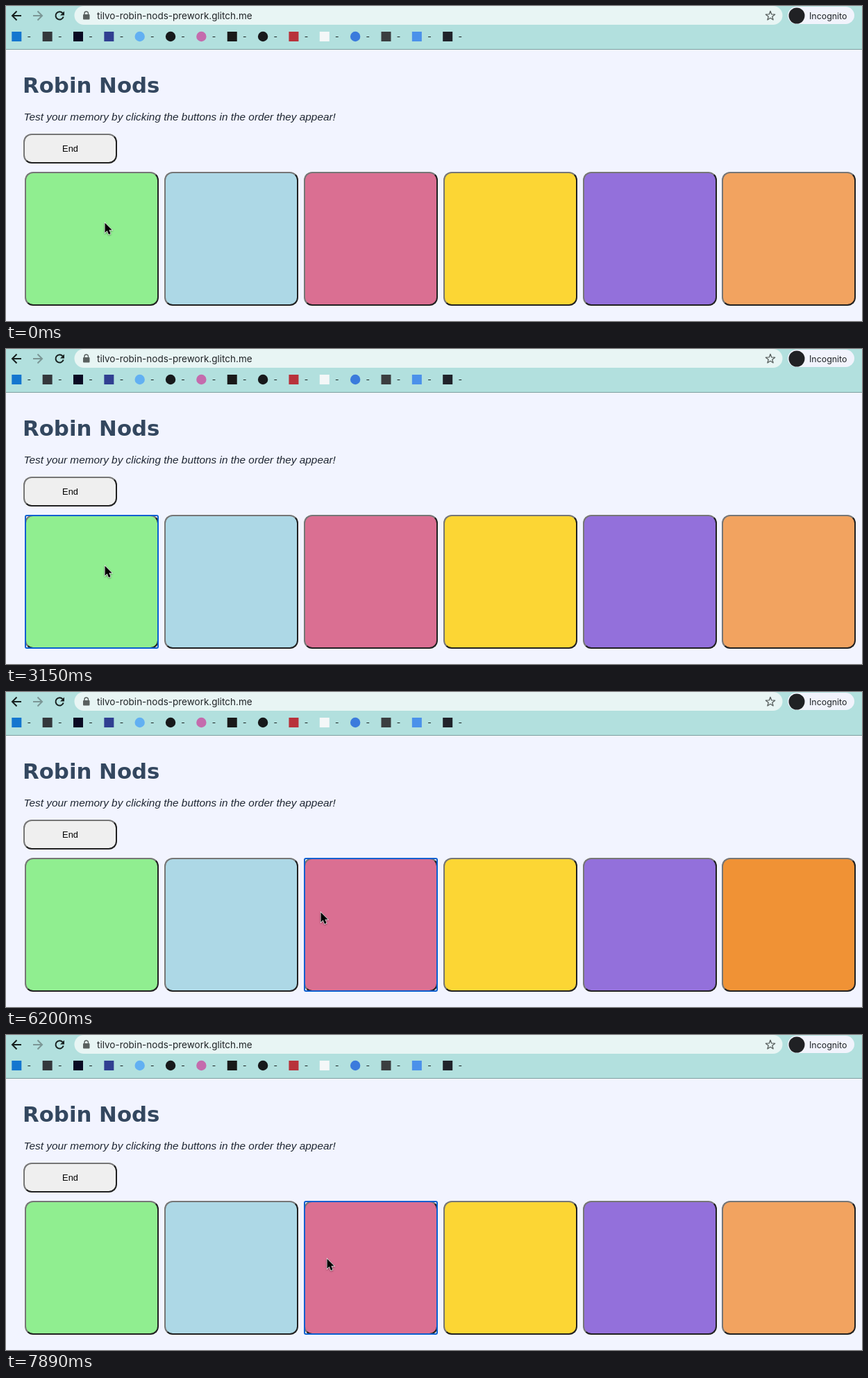
An HTML page for the animation above (8000 ms loop, 1233 by 454 pixels).

```html
<!DOCTYPE html>
<html lang="en">
<head>
<meta charset="utf-8">
<title>Robin Nods</title>
<style>
  html, body { margin: 0; width: 100%; height: 100%; overflow: hidden; background: #f2f4ff; }
  #stage { position: absolute; left: 0; top: 0; width: 1233px; height: 454px; overflow: hidden; }
  svg { position: absolute; left: 0; top: 0; }
  .box {
    position: absolute; box-sizing: border-box;
    border: 2px solid; border-color: #767676 #212121 #212121 #767676;
  }
  .pad { top: 239px; width: 193px; height: 193px; border-radius: 12px; }
  #end { left: 25px; top: 184px; width: 135px; height: 43px; border-radius: 12px; background: #efefef; }
  #ring {
    position: absolute; box-sizing: border-box; top: 239px; width: 193px; height: 193px;
    border: 2px solid #0b5fd0; border-radius: 3px;
  }
  .ui { font-family: Inter, Roboto, sans-serif; }
  .body { font-family: "Liberation Sans", Arial, sans-serif; }
  .title { font: bold 30.8px "DejaVu Sans", Verdana, sans-serif; }
</style>
</head>
<body>
<div id="stage">
  <svg width="1233" height="454" viewBox="0 0 1233 454">
    <rect width="1233" height="62" fill="#b2e0de"/>
    <rect y="62" width="1233" height="1" fill="#7f9f9f"/>
    <rect x="98.5" y="0" width="1020" height="27" rx="13.5" fill="#e8f5f4"/>
    <rect x="1126" y="1" width="96" height="25" rx="12.5" fill="#f1f3fc"/>
    <g fill="none" stroke-width="2">
      <path d="M22 14H9.500M15.500 7.500 9 14l6.500 6.500" stroke="#17201f"/>
      <path d="M39 14h12.500M45.500 7.500 52 14l-6.500 6.500" stroke="#7b9695"/>
      <path d="M81.600 10.200A5.700 5.700 0 1 0 82.700 15.500" stroke="#17201f"/>
    </g>
    <path d="M84 7.500v6h-6z" fill="#17201f"/>
    <rect x="111" y="12" width="9.500" height="7.500" rx="1" fill="#59605f"/>
    <path d="M113 12.500v-1.800a2.750 2.750 0 0 1 5.500 0v1.800" fill="none" stroke="#59605f" stroke-width="1.400"/>
    <path id="star" fill="none" stroke="#59605f" stroke-width="1.300" stroke-linejoin="round"/>
    <circle cx="1139" cy="14" r="11.500" fill="#202124"/>
    <g class="ui" fill="#202427">
      <text x="131" y="18.500" font-size="13.5">tilvo-robin-nods-prework.glitch.me</text>
      <text x="1157" y="18.500" font-size="12.4">Incognito</text>
    </g>
    <g id="bookmarks"></g>
    <text class="title" x="24" y="124.500" fill="#33475f">Robin Nods</text>
    <text class="body" x="25.500" y="165" font-size="15.37" font-style="italic" fill="#1f2733">Test your memory by clicking the buttons in the order they appear!</text>
  </svg>
  <div id="end" class="box"></div>
  <div id="pads"></div>
  <div id="ring"></div>
  <svg width="1233" height="454" viewBox="0 0 1233 454">
    <text class="body" x="92.500" y="210" font-size="12.8" text-anchor="middle">End</text>
    <path id="cursor" d="M0 0v14.300l3.200-3 2.300 5.400 2.700-1.100-2.300-5.300h4.300z" stroke="#fff" stroke-width="1.200" paint-order="stroke" style="filter:drop-shadow(0 1px 1px #0006)"/>
  </svg>
</div>
<script>
const LOOP = 8000;
const byId = id => document.getElementById(id);
const padX = i => Math.round(27 + 200.88 * i);

const idle = ["#90ee90", "#add8e6", "#da6f92", "#fcd634", "#9370db", "#f2a360"];
const lit = { 0: "#3a8008", 2: "#dc403a", 5: "#f09235" };

// [pad, on, off] in ms
const flashes = [
  [0, 90, 360], [0, 990, 1620], [2, 1980, 2700], [0, 2970, 3150], [2, 3420, 3590],
  [0, 4220, 4850], [2, 5210, 5930], [5, 6200, 6920], [0, 7280, 7460], [2, 7730, 7890]
];

// [start, focused pad]
const focus = [[0, -1], [90, 0], [3420, 2], [7280, 0], [7730, 2]];

// [start, x, y]
const pointer = [
  [0, 142.5, 312.5], [3240, 255, 316], [3330, 400, 318], [3420, 453.5, 317.5],
  [6740, 420, 321], [6830, 260, 326], [6920, 146.5, 325.5], [7010, 127, 325], [7100, 122.5, 324],
  [7550, 250, 323], [7640, 420, 322], [7730, 462.5, 322.5]
];

const latest = (steps, t) => steps.filter(s => s[0] <= t).pop();

function drawStar() {
  let d = "";
  for (let i = 0; i < 10; i++) {
    const r = i % 2 ? 2.9 : 7, a = (i / 5 - 0.5) * Math.PI;
    d += (i ? "L" : "M") + (1101 + r * Math.cos(a)).toFixed(2) + " " + (14.3 + r * Math.sin(a)).toFixed(2);
  }
  byId("star").setAttribute("d", d + "z");
}

function drawBookmarks() {
  const marks = [
    ["s", "#1476cf"], ["s", "#34383c"], ["s", "#0a0a23"], ["s", "#303f91"], ["c", "#62b0f2"],
    ["c", "#17191b"], ["c", "#c46bad"], ["s", "#191919"], ["c", "#17191b"], ["s", "#b8323b"],
    ["s", "#f4f7f8"], ["c", "#3b7bdc"], ["s", "#3b3e40"], ["s", "#4b91ea"], ["s", "#20232a"]
  ];
  byId("bookmarks").innerHTML = marks.map(([kind, color], i) => {
    const x = 15.3 + 44.35 * i;
    const icon = kind === "c"
      ? `<circle cx="${x}" cy="44" r="7.2" fill="${color}"/>`
      : `<rect x="${x - 7}" y="37" width="14" height="14" fill="${color}"/>`;
    return icon + `<text class="ui" x="${x + 15.3}" y="48" font-size="12" fill="#17201f">-</text>`;
  }).join("");
}

const pads = idle.map((color, i) => {
  const pad = document.createElement("div");
  pad.className = "box pad";
  pad.style.left = padX(i) + "px";
  byId("pads").append(pad);
  return pad;
});

function render(t) {
  pads.forEach((pad, i) => {
    const on = flashes.some(([p, from, to]) => p === i && t >= from && t < to);
    pad.style.background = on ? lit[i] : idle[i];
  });
  const focused = latest(focus, t)[1];
  const ring = byId("ring");
  ring.style.display = focused < 0 ? "none" : "block";
  ring.style.left = padX(focused) + "px";
  const [, x, y] = latest(pointer, t);
  byId("cursor").setAttribute("transform", `translate(${x} ${y})`);
}

drawStar();
drawBookmarks();
render(0);
const start = performance.now();
function tick() {
  render((performance.now() - start) % LOOP);
  requestAnimationFrame(tick);
}
requestAnimationFrame(tick);
</script>
</body>
</html>
```
